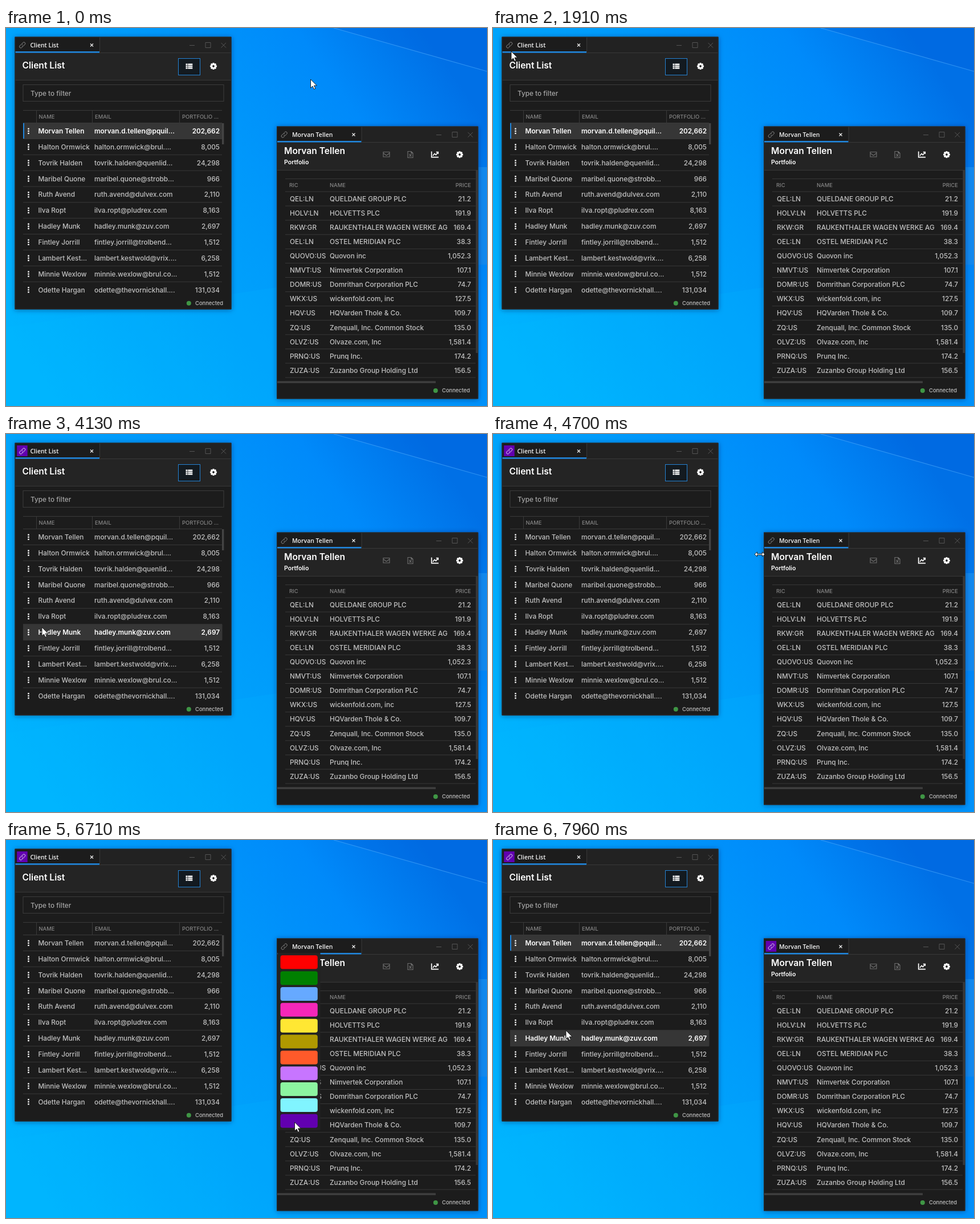
These frames come from a looping animation (844 by 663 pixels, 7990 ms). An HTML page:

```html
<!DOCTYPE html>
<html lang="en">
<head>
<meta charset="utf-8">
<title>Linked windows</title>
<style>
html, body { margin: 0; width: 100%; height: 100%; overflow: hidden; background: #0095f5; }
svg { display: block; width: 844px; height: 663px; }
text { font: 500 11.8px Inter, "Open Sans", sans-serif; fill: #c2c2c2; white-space: pre; }
.tab { font: 600 10.5px "Open Sans", sans-serif; fill: #f4f4f4; }
.title { font-size: 15.6px; font-weight: 600; fill: #fff; }
.sub { font-size: 10.6px; font-weight: 600; fill: #fff; }
.head { font-size: 9.4px; fill: #858585; }
.small { font-size: 9.4px; fill: #c0c0c0; }
.hint { fill: #a5a5a5; }
.end { text-anchor: end; }
.bg, .bar { visibility: hidden; }
.bg { fill: #363636; }
.bar { fill: #2186dc; }
.on .bg, .sel .bg, .sel .bar { visibility: visible; }
.on text, .sel text { fill: #fff; font-weight: 600; }
</style>
</head>
<body>
<svg id="stage" viewBox="0 0 844 663" xmlns="http://www.w3.org/2000/svg"></svg>
<script>
const LOOP = 7990;
const ROW1 = { y: 166.8, h: 27.85 };
const ROW2 = { y: 287, h: 25.08 };

const clients = [
  ['Morvan Tellen', 'morvan.d.tellen@pquil...', '202,662'],
  ['Halton Ormwick', 'halton.ormwick@brul....', '8,005'],
  ['Tovrik Halden', 'tovrik.halden@quenlid...', '24,298'],
  ['Maribel Quone', 'maribel.quone@strobb...', '966'],
  ['Ruth Avend', 'ruth.avend@dulvex.com', '2,110'],
  ['Ilva Ropt', 'ilva.ropt@pludrex.com', '8,163'],
  ['Hadley Munk', 'hadley.munk@zuv.com', '2,697'],
  ['Fintley Jorrill', 'fintley.jorrill@trolbend...', '1,512'],
  ['Lambert Kest...', 'lambert.kestwold@vrix....', '6,258'],
  ['Minnie Wexlow', 'minnie.wexlow@brul.co...', '1,512'],
  ['Odette Hargan', 'odette@thevornickhall....', '131,034']
];
const stocks = [
  ['QEL:LN', 'QUELDANE GROUP PLC', '21.2'],
  ['HOLV:LN', 'HOLVETTS PLC', '191.9'],
  ['RKW:GR', 'RAUKENTHALER WAGEN WERKE AG', '169.4'],
  ['OEL:LN', 'OSTEL MERIDIAN PLC', '38.3'],
  ['QUOVO:US', 'Quovon inc', '1,052.3'],
  ['NMVT:US', 'Nimvertek Corporation', '107.1'],
  ['DOMR:US', 'Domrithan Corporation PLC', '74.7'],
  ['WKX:US', 'wickenfold.com, inc', '127.5'],
  ['HQV:US', 'HQVarden Thole &amp; Co.', '109.7'],
  ['ZQ:US', 'Zenquall, Inc. Common Stock', '135.0'],
  ['OLVZ:US', 'Olvaze.com, Inc', '1,581.4'],
  ['PRNQ:US', 'Prunq Inc.', '174.2'],
  ['ZUZA:US', 'Zuzanbo Group Holding Ltd', '156.5']
];
const swatches = ['#ff0000', '#008000', '#66a9ff', '#f527b9', '#ffe733', '#b09900',
  '#ff5a2a', '#c775ff', '#8cf5a0', '#80f4ff', '#6200b0'];

// Cursor stops: time, x, y
const stops = [
  [320, 534.5, 90], [520, 530, 91], [920, 530, 91], [1250, 330, 97], [1700, 46, 56],
  [1730, 46, 56], [1910, 32, 41], [2080, 25, 26], [2760, 25, 26], [3330, 56, 334],
  [3530, 57, 339], [4060, 57, 339], [4380, 105, 339], [4700, 468, 211], [5080, 490, 181],
  [6020, 490, 181], [6640, 506.5, 495], [7020, 506.5, 495], [7740, 165, 393], [7950, 128, 334]
];

const rect = (x, y, w, h, fill, more = '') =>
  `<rect x="${x}" y="${y}" width="${w}" height="${h}" fill="${fill}" ${more}/>`;
const text = (x, y, s, cls = '') => `<text x="${x}" y="${y}" class="${cls}">${s}</text>`;
const line = (d, color, w = 1) => `<path d="${d}" fill="none" stroke="${color}" stroke-width="${w}"/>`;
const at = (x, y, s, more = '') => `<g transform="translate(${x} ${y})" ${more}>${s}</g>`;
const each = (list, fn) => list.map(fn).join('');

function gear(x, y) {
  const teeth = each([0, 45, 90, 135], a => rect(-1.5, -6, 3, 12, '#fff', `rx=".6" transform="rotate(${a})"`));
  return at(x, y, teeth + '<circle r="3.2" fill="none" stroke="#fff" stroke-width="2.6"/><circle r="1.9" fill="#242424"/>');
}

function link(x, y, id) {
  const half = 'M-.8 -2.6 1 -4.4A2.3 2.3 0 0 1 4.4 -1L2.2 1.2A2.2 2.2 0 0 1 -.9 1.2';
  const chain = color => line(half, color) + `<g transform="rotate(180)">${line(half, color)}</g>`;
  return at(x, y, chain('#8a8a8a') +
    `<g id="${id}">${rect(-9.5, -10, 18.5, 19, '#6200b0')}${chain('#e4d8f0')}</g>`);
}

// Window frame with tab, window buttons and status line
function frame(w, h, headH, foot, tab, id) {
  return rect(-.5, -.5, w + 1, h + 1, '#1e1e1e', 'filter="url(#shadow)"') +
    rect(0, 0, w, 27, '#222') + rect(0, 0, 148, 27, '#1c1c1c') +
    rect(0, 27, w, headH, '#242424') +
    line(`M148.5 0V26M148 27.5H${w}M0 ${27.5 + headH}H${w}`, '#383838') +
    rect(0, 25, 148, 2.6, '#2186dc') +
    link(12.7, 14, id) + text(26.4, 18, tab, 'tab') +
    line('M132 11.5l5 5m0 -5l-5 5', '#f0f0f0', 1.2) +
    line(`M${w - 73} 14.5h9M${w - 45} 9.5h9v9h-9zM${w - 17.5} 10l8.5 8.5m0 -8.5l-8.5 8.5`, '#555') +
    `<circle cx="${w - 74.2}" cy="${h - foot}" r="4" fill="#3f9645"/>` +
    text(w - 63, h - foot + 3.4, 'Connected', 'small') +
    line(`M0 0H${w}V${h}H0Z`, '#2b2b2b');
}

function clientRow(r, i) {
  const y = ROW1.y + i * ROW1.h, mid = y + 14;
  return '<g class="client">' + rect(30, y, 349.5, 27.4, '', 'class="bg"') +
    rect(30, y, 2, 27.4, '', 'class="bar"') +
    each([-4, 0, 4], d => rect(38.2, mid + d - 1.3, 2.6, 2.6, '#f0f0f0', 'rx=".6"')) +
    text(56.5, mid + 4.2, r[0]) + text(155, mid + 4.2, r[1]) + text(375, mid + 4.2, r[2], 'end') +
    (i < 10 ? line(`M30 ${y + 27.7}H379`, '#383838') : '') + '</g>';
}

function stockRow(r, i) {
  const y = ROW2.y + i * ROW2.h, base = y + 16.8;
  return '<g class="stock">' + rect(490, y, 334, 24.6, '', 'class="bg"') +
    text(498, base, r[0]) + text(568, base, r[1]) + text(816, base, r[2], 'end') +
    line(`M490 ${y + 25.1}H824`, '#383838') + '</g>';
}

const popup = id => `<g id="${id}">` + rect(1, 25, 75, 311, '#232323') +
  each(swatches, (c, i) => rect(6, 29.3 + i * 27.85, 65.3, 24, c, 'rx="4"')) + '</g>';

const wallpaper = rect(0, 0, 844, 663, 'url(#sky)') +
  '<path d="M575 0H844V76Z" fill="#0058d4" opacity=".25"/>' +
  '<path d="M475 455 0 525V663H475Z" fill="#00b8ff" opacity=".12"/>' +
  line('M575 0 844 76', 'rgba(90,180,255,.5)', 1.2) +
  rect(829, 244, 15, 171, '#1288ee');

const clientList = at(16, 16, frame(379, 477, 48, 10.2, 'Client List', 'link1')) +
  text(28.5, 71.3, 'Client List', 'title') +
  rect(302.5, 53.5, 38, 29, '#131a20', 'stroke="#2583d4"') +
  each([0, 1, 2], i => rect(315.5, 62.5 + i * 3.3, 3, 2.5, '#fff') + rect(319.3, 62.5 + i * 3.3, 8, 2.5, '#fff')) +
  gear(364, 67) +
  rect(30, 99.5, 352, 29, '#1c1c1c', 'stroke="#3c3c3c"') + text(43, 118.8, 'Type to filter', 'hint') +
  line('M30 144.5H379M30 166.5H379M53.5 145V166M151.5 145V166M304.5 145V166', '#3a3a3a') +
  text(57.5, 159, 'NAME', 'head') + text(156, 159, 'EMAIL', 'head') + text(309, 159, 'PORTFOLIO ...', 'head') +
  each(clients, clientRow) + rect(379, 167, 3.4, 37, '#444');

const portfolio = at(475.5, 173, frame(352.5, 477, 49, 14, clients[0][0], 'link2')) +
  text(488, 221, clients[0][0], 'title') + text(488, 239, 'Portfolio', 'sub') +
  line('M662 217.5h11v8.5h-11zM662 219.5l5.5 4 5.5 -4', '#6c6c6c', 1.2) +
  line('M705 216.5h6l3 3v8h-9zM711 216.5v3h3M707.5 221l4 4.5m0 -4.5l-4 4.5', '#6c6c6c', 1.2) +
  line('M746.7 216.5V226.7H759', '#fff', 1.7) + line('M749 224l3 -3.5 2.3 2 3.5 -4.2M754.8 217.6h3.5v3.4', '#fff', 1.6) +
  gear(796, 222) +
  line('M490 264.5H824M490 287H824', '#383838') +
  text(497, 278.5, 'RIC', 'head') + text(568, 278.5, 'NAME', 'head') + text(816, 278.5, 'PRICE', 'head end') +
  each(stocks, stockRow) +
  rect(824.5, 249, 3.5, 321, '#3a3a3a') + rect(476, 619.3, 278, 3.6, '#3e3e3e');

const cursor = '<g id="cursor">' +
  '<path id="arrow" d="M0 0V15.2L3.5 12 5.9 17.3 8.4 16.2 6 11H10.9Z" fill="#fff" stroke="#111" stroke-width=".9"/>' +
  '<path id="sizer" d="M-9 0 -4.5 -4V-1H4.5V-4L9 0 4.5 4V1H-4.5V4Z" fill="#fff" stroke="#111" stroke-width=".9"/></g>';

const $ = id => document.getElementById(id);
$('stage').innerHTML = `<defs>
  <linearGradient id="sky" x1="0" y1=".8" x2="1" y2=".25">
    <stop offset="0" stop-color="#00b4fe"/><stop offset=".5" stop-color="#009cfb"/>
    <stop offset=".8" stop-color="#008afa"/><stop offset="1" stop-color="#0070e6"/>
  </linearGradient>
  <filter id="shadow" x="-10%" y="-10%" width="120%" height="120%">
    <feDropShadow dx="0" dy="1" stdDeviation="4" flood-color="#002050" flood-opacity=".5"/>
  </filter></defs>` + wallpaper + clientList + portfolio +
  at(16, 16, popup('popup1')) + at(475.5, 173, popup('popup2')) + cursor;

const clientRows = document.querySelectorAll('.client');
const stockRows = document.querySelectorAll('.stock');

const clamp = v => Math.max(0, Math.min(1, v));
const ramp = (t, a, b) => clamp((t - a) / (b - a));
const show = (id, alpha) => $(id).setAttribute('opacity', alpha);

function cursorAt(t) {
  const i = stops.findIndex(s => s[0] > t);
  if (i === 0) return stops[0].slice(1);
  if (i < 0) return stops[stops.length - 1].slice(1);
  const [t0, x0, y0] = stops[i - 1], [t1, x1, y1] = stops[i];
  const p = (t - t0) / (t1 - t0), e = p * p * (3 - 2 * p);
  return [x0 + (x1 - x0) * e, y0 + (y1 - y0) * e];
}

const rowAt = (x, y, left, right, rows) =>
  x >= left && x < right ? Math.floor((y - rows.y) / rows.h) : -1;

function draw(t) {
  const [x, y] = cursorAt(t);
  const open1 = ramp(t, 2210, 2370) * (1 - ramp(t, 3590, 3660));
  const open2 = ramp(t, 5230, 5450) * (1 - ramp(t, 6940, 7010));
  show('popup1', open1);
  show('popup2', open2);
  show('link1', t >= 3630 ? 1 : 0);
  show('link2', t >= 6980 ? 1 : 0);

  const over1 = open1 ? -1 : rowAt(x, y, 30, 379, ROW1);
  const over2 = open2 ? -1 : rowAt(x, y, 490, 824, ROW2);
  const selected = t < 3630 || t >= 7050;
  clientRows.forEach((row, i) => {
    row.classList.toggle('on', i === over1);
    row.classList.toggle('sel', i === 0 && selected);
  });
  stockRows.forEach((row, i) => row.classList.toggle('on', i === over2));

  const edge = x > 464 && x < 477 && y > 173;
  $('cursor').setAttribute('transform', `translate(${x.toFixed(1)} ${y.toFixed(1)})`);
  show('arrow', edge ? 0 : 1);
  show('sizer', edge ? 1 : 0);
}

function tick() {
  draw(performance.now() % LOOP);
  requestAnimationFrame(tick);
}
tick();
</script>
</body>
</html>
```
